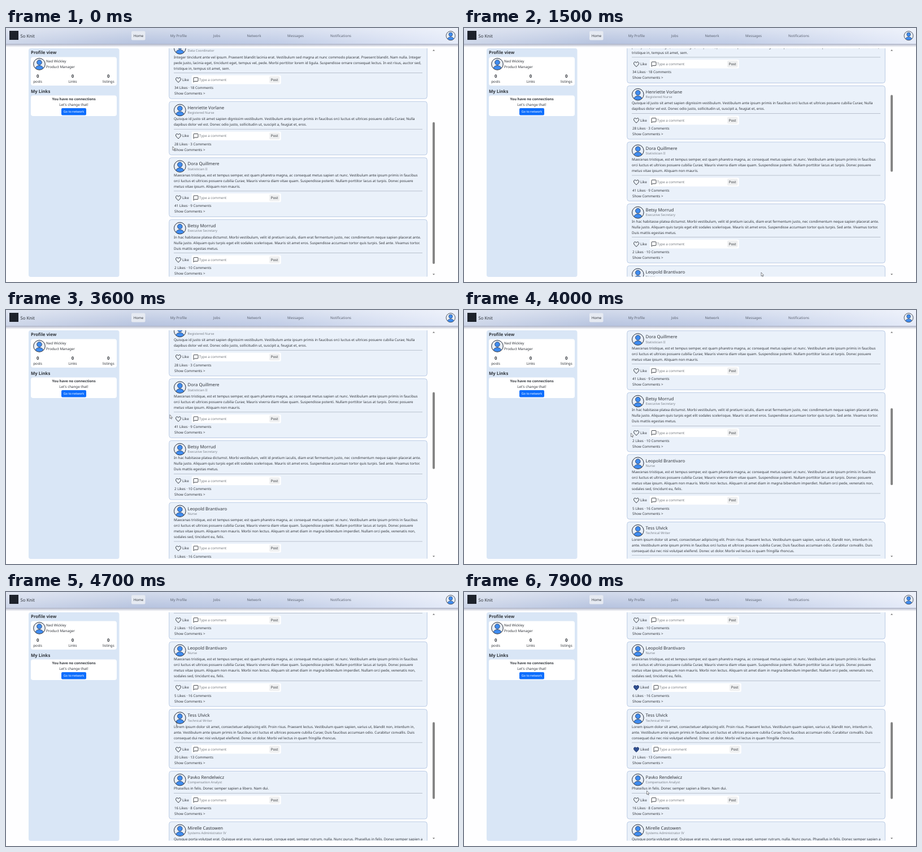
Write an HTML page that moves like this. It is 800 px wide and 450 px high and loops after 8 s.

```html
<!DOCTYPE html>
<html lang="en">
<head>
<meta charset="utf-8">
<style>
  html, body { margin: 0; width: 100%; height: 100%; overflow: hidden; background: #fefeff; }
  svg { display: block; width: 800px; height: 450px; }
  text { font: 6.23px "Noto Sans", "Open Sans", sans-serif; fill: #30343a; text-rendering: geometricPrecision; }
  .big { font-size: 7.78px; }
  .bold { font-weight: 600; }
  .role { font-size: 5.78px; fill: #7c828a; }
  .hint { fill: #757a80; }
  .mid { text-anchor: middle; }
  .nav { fill: #5b6270; }
  .button { font-size: 5.45px; fill: #fff; }
</style>
</head>
<body>
<svg id="stage" viewBox="0 0 800 450">
  <defs>
    <linearGradient id="bar" x1="0" y1="0" x2="1" y2="0">
      <stop offset="0" stop-color="#cdd6e9"/>
      <stop offset=".3" stop-color="#b6c3df"/>
      <stop offset=".6" stop-color="#c0cce6"/>
      <stop offset="1" stop-color="#e5ebf9"/>
    </linearGradient>
    <linearGradient id="shine" x1="0" y1="0" x2="0" y2="1">
      <stop offset="0" stop-color="#fff" stop-opacity=".4"/>
      <stop offset="1" stop-color="#fff" stop-opacity="0"/>
    </linearGradient>
    <linearGradient id="shade" x1="0" y1="0" x2="0" y2="1">
      <stop offset="0" stop-color="#59658c" stop-opacity=".5"/>
      <stop offset="1" stop-color="#59658c" stop-opacity="0"/>
    </linearGradient>
    <clipPath id="view"><rect x="280" y="36" width="472" height="404.6"/></clipPath>
    <clipPath id="face"><circle r="10"/></clipPath>
    <g id="avatar">
      <circle r="10.3" fill="#e8eff9"/>
      <g clip-path="url(#face)" fill="#3f8cf0" stroke="#26344f" stroke-width=".8">
        <ellipse cy="9.3" rx="7.6" ry="6.8"/>
        <circle cy="-3" r="4.3"/>
      </g>
      <circle r="10.3" fill="none" stroke="#252a36" stroke-width="1"/>
    </g>
    <path id="heart" d="M0 4.3 C-2 2.6 -4.5 .6 -4.5 -1.6 C-4.5 -4.4 -1.3 -5 0 -2.6 C1.3 -5 4.5 -4.4 4.5 -1.6 C4.5 .6 2 2.6 0 4.3Z"/>
    <path id="bubble" d="M-4 4.3 V-3 Q-4 -4 -3 -4 H3 Q4 -4 4 -3 V1.6 Q4 2.6 3 2.6 H-2.2Z" fill="none" stroke="#2d3138" stroke-width=".9" stroke-linejoin="round"/>
  </defs>
</svg>
<script>
const NS = 'http://www.w3.org/2000/svg';
const LOOP = 8000, VIEW_TOP = 36, VIEW_H = 404.6, TRACK_TOP = 41, TRACK_H = 394;
const stage = document.getElementById('stage');

function add(parent, tag, attrs = {}, text) {
  const el = document.createElementNS(NS, tag);
  for (const key in attrs) el.setAttribute(key, attrs[key]);
  if (text !== undefined) el.textContent = text;
  parent.appendChild(el);
  return el;
}
const label = (parent, x, y, text, cls = '') => add(parent, 'text', { x, y, class: cls }, text);
const box = (parent, x, y, width, height, fill, rx = 0) =>
  add(parent, 'rect', { x, y, width, height, fill, rx });
const stamp = (parent, id, x, y, scale = 1) =>
  add(parent, 'use', { href: '#' + id, transform: `translate(${x} ${y}) scale(${scale})` });

// Header
box(stage, 0, 28, 800, 6, 'url(#shade)');
box(stage, 0, 0, 800, 28, 'url(#bar)');
box(stage, 0, 0, 800, 28, 'url(#shine)');
box(stage, 6, 5, 16, 16, '#1d222b');
label(stage, 25.5, 17, 'So Knit', 'big');
box(stage, 222, 5.5, 24.5, 16, '#e6eaf2', 2);
[['Home', 234.5], ['My Profile', 305.5], ['Jobs', 373], ['Network', 439], ['Messages', 512.5], ['Notifications', 592.5]]
  .forEach(([name, x], i) => label(stage, x, 16.1, name, i ? 'mid nav' : 'mid'));
stamp(stage, 'avatar', 787, 13.7, .78);

// Sidebar
box(stage, 40, 36, 160.5, 405, '#d9e6f6', 4);
label(stage, 44, 46.4, 'Profile view', 'big bold');
box(stage, 44, 51.5, 152, 50.5, '#fff', 4);
stamp(stage, 'avatar', 59, 64);
label(stage, 71, 61, 'Ned Wickley');
label(stage, 71, 71, 'Product Manager');
[['posts', 56.2], ['Links', 118], ['listings', 181.3]].forEach(([name, x]) => {
  label(stage, x, 88.3, '0', 'mid big bold');
  label(stage, x, 97.3, name, 'mid');
});
label(stage, 44, 114.6, 'My Links', 'big bold');
box(stage, 44, 119.5, 152, 36.5, '#fff', 4);
label(stage, 120, 128.2, 'You have no connections', 'mid bold');
label(stage, 120, 137.7, "Let's change that!", 'mid');
box(stage, 98, 142, 44, 12.5, '#0d6efd', 2);
label(stage, 120, 150.3, 'Go to network', 'mid button');

// Feed
const maecenas = [
  'Maecenas tristique, est et tempus semper, est quam pharetra magna, ac consequat metus sapien ut nunc. Vestibulum ante ipsum primis in faucibus',
  'orci luctus et ultrices posuere cubilia Curae; Mauris viverra diam vitae quam. Suspendisse potenti. Nullam porttitor lacus at turpis. Donec posuere'
];
const posts = [
  { name: 'Oswin Tarrelby', role: 'Data Coordinator', likes: 34, comments: 18, body: [
    'Integer tincidunt ante vel ipsum. Praesent blandit lacinia erat. Vestibulum sed magna at nunc commodo placerat. Praesent blandit. Nam nulla. Integer',
    'pede justo, lacinia eget, tincidunt eget, tempus vel, pede. Morbi porttitor lorem id ligula. Suspendisse ornare consequat lectus. In est risus, auctor sed,',
    'tristique in, tempus sit amet, sem.'] },
  { name: 'Henriette Vorlane', role: 'Registered Nurse', likes: 28, comments: 3, body: [
    'Quisque id justo sit amet sapien dignissim vestibulum. Vestibulum ante ipsum primis in faucibus orci luctus et ultrices posuere cubilia Curae; Nulla',
    'dapibus dolor vel est. Donec odio justo, sollicitudin ut, suscipit a, feugiat et, eros.'] },
  { name: 'Dora Quillmere', role: 'Statistician II', likes: 41, comments: 9, body: [
    ...maecenas, 'metus vitae ipsum. Aliquam non mauris.'] },
  { name: 'Betsy Morrud', role: 'Executive Secretary', likes: 2, comments: 10, body: [
    'In hac habitasse platea dictumst. Morbi vestibulum, velit id pretium iaculis, diam erat fermentum justo, nec condimentum neque sapien placerat ante.',
    'Nulla justo. Aliquam quis turpis eget elit sodales scelerisque. Mauris sit amet eros. Suspendisse accumsan tortor quis turpis. Sed ante. Vivamus tortor.',
    'Duis mattis egestas metus.'] },
  { name: 'Leopold Brantivaro', role: 'Nurse', likes: 5, comments: 16, likedAt: 5600, body: [
    ...maecenas,
    'metus vitae ipsum. Aliquam non mauris. Morbi non lectus. Aliquam sit amet diam in magna bibendum imperdiet. Nullam orci pede, venenatis non,',
    'sodales sed, tincidunt eu, felis.'] },
  { name: 'Tess Ulvick', role: 'Technical Writer', likes: 20, comments: 13, likedAt: 7200, hover: [6450, 6880], body: [
    'Lorem ipsum dolor sit amet, consectetuer adipiscing elit. Proin risus. Praesent lectus. Vestibulum quam sapien, varius ut, blandit non, interdum in,',
    'ante. Vestibulum ante ipsum primis in faucibus orci luctus et ultrices posuere cubilia Curae; Duis faucibus accumsan odio. Curabitur convallis. Duis',
    'consequat dui nec nisi volutpat eleifend. Donec ut dolor. Morbi vel lectus in quam fringilla rhoncus.'] },
  { name: 'Pavko Rendelwicz', role: 'Compensation Analyst', likes: 16, comments: 8, body: [
    'Phasellus in felis. Donec semper sapien a libero. Nam dui.'] },
  { name: 'Mirelle Castowen', role: 'Systems Administrator IV', likes: 7, comments: 5, body: [
    'Quisque porta volutpat erat. Quisque erat eros, viverra eget, congue eget, semper rutrum, nulla. Nunc purus. Phasellus in felis. Donec semper sapien a',
    'libero. Nam dui.'] }
];
const FIRST_BATCH = 4, LOADED_AT = 500;

const clip = add(stage, 'g', { 'clip-path': 'url(#view)' });
const feed = add(clip, 'g');
let nextTop = 222.8;
posts.forEach(post => {
  const extra = 10 * (post.body.length - 1), height = 84.6 + extra;
  const card = post.card = add(feed, 'g', { transform: `translate(0 ${nextTop})` });
  nextTop += height + 5;
  const frame = box(card, 288.7, 0, 456.6, height, '#eaf1fa', 4);
  frame.setAttribute('stroke', '#abbfdf');
  frame.setAttribute('stroke-width', .8);
  stamp(card, 'avatar', 307.8, 15.3);
  label(card, 321.6, 13.6, post.name, 'big');
  label(card, 321.6, 21.8, post.role, 'role');
  post.body.forEach((line, i) => label(card, 297, 33.1 + 10 * i, line));

  const row = add(card, 'g', { transform: `translate(0 ${extra})` });
  box(row, 297, 38.7, 440, .7, '#a4adbb');
  post.heart = stamp(row, 'heart', 305, 51.4);
  post.heart.setAttribute('stroke-width', 1);
  post.likeText = label(row, 312, 53.2, 'Like');
  post.reply = add(row, 'g');
  box(post.reply, 328.7, 43.2, 158, 15.6, '#fff', 2);
  stamp(post.reply, 'bubble', 336, 51.2);
  label(post.reply, 341.8, 53.2, 'Type a comment', 'hint');
  box(post.reply, 466, 45, 18.5, 12, '#eff0f1', 2);
  label(post.reply, 475.2, 53.2, 'Post', 'mid');
  post.counts = label(row, 298, 67.6);
  post.show = label(row, 298, 77.5, 'Show Comments >');
});

// Scrollbar
const arrow = { fill: '#6d6d6d' };
add(stage, 'path', { d: 'M755 40.5 l2 -2.2 l2 2.2z', ...arrow });
add(stage, 'path', { d: 'M755 435.5 l2 2.2 l2 -2.2z', ...arrow });
const thumb = box(stage, 755, 0, 4, 0, '#858585', 2);

// Pointer shapes
const pointer = add(stage, 'g');
const ink = { fill: '#fff', stroke: '#3b3f46', 'stroke-width': .6, 'stroke-linejoin': 'round' };
const shapes = {
  arrow: add(pointer, 'path', { d: 'M0 0 V6.6 L1.5 5.3 L2.5 7.6 L3.5 7.1 L2.5 5 H4.5Z', ...ink }),
  beam: add(pointer, 'path', { d: 'M-1.5 -3.5 H1.5 M0 -3.5 V3.5 M-1.5 3.5 H1.5', ...ink, fill: 'none' }),
  hand: add(pointer, 'path', { d: 'M-.8 .3 Q0 -.7 .8 .3 V3 L4 3.7 Q4.6 4 4.4 5 L3.7 8 H-.4 L-2.5 4.8 Q-2.4 3.8 -.8 5Z', ...ink })
};

const scrollKeys = [[0, 202], [150, 230], [3300, 230], [3600, 310], [4000, 395], [4600, 563], [LOOP, 563]];
const pointerKeys = [
  [0, 295, 210], [300, 295, 210], [900, 470, 442], [1500, 526, 433], [1650, 526, 433], [3300, 290, 185.5],
  [3600, 290, 185.5], [4000, 295.5, 218], [4700, 302, 234], [5300, 305, 169], [5800, 305, 169],
  [6500, 318, 303], [6800, 316, 291], [7100, 305, 279], [7350, 305, 279], [7900, 323.5, 352], [LOOP, 324, 353]
];
const shapeKeys = [
  [0, 'arrow'], [4500, 'beam'], [5150, 'hand'], [5900, 'beam'], [6420, 'hand'],
  [6700, 'beam'], [6950, 'hand'], [7420, 'arrow']
];

function sample(keys, t) {
  const i = Math.max(1, keys.findIndex(key => key[0] > t));
  const [a, b] = [keys[i - 1], keys[i]];
  const k = (t - a[0]) / (b[0] - a[0]);
  return a.slice(1).map((value, j) => value + (b[j + 1] - value) * k);
}

function render(t) {
  const [scroll] = sample(scrollKeys, t);
  const loaded = t >= LOADED_AT;
  const ratio = TRACK_H / (loaded ? 1170 : 634);
  feed.setAttribute('transform', `translate(0 ${-scroll})`);
  thumb.setAttribute('y', TRACK_TOP + scroll * ratio);
  thumb.setAttribute('height', VIEW_H * ratio);

  posts.forEach((post, i) => {
    const liked = t >= post.likedAt;
    const hovered = post.hover && t >= post.hover[0] && t < post.hover[1];
    post.card.setAttribute('visibility', loaded || i < FIRST_BATCH ? 'visible' : 'hidden');
    post.heart.setAttribute('fill', liked ? '#2f4f92' : 'none');
    post.heart.setAttribute('stroke', liked ? '#26396a' : '#2d3138');
    post.likeText.textContent = liked ? 'Liked' : 'Like';
    post.reply.setAttribute('transform', `translate(${liked ? 4 : 0} 0)`);
    post.counts.textContent = `${post.likes + (liked ? 1 : 0)} Likes · ${post.comments} Comments`;
    post.show.setAttribute('text-decoration', hovered ? 'underline' : 'none');
  });

  const [x, y] = sample(pointerKeys, t);
  const shape = shapeKeys.filter(key => key[0] <= t).pop()[1];
  pointer.setAttribute('transform', `translate(${x} ${y})`);
  for (const name in shapes) shapes[name].setAttribute('visibility', name === shape ? 'visible' : 'hidden');
}

const start = performance.now();
function tick() {
  render((performance.now() - start) % LOOP);
  requestAnimationFrame(tick);
}
tick();
</script>
</body>
</html>
```
